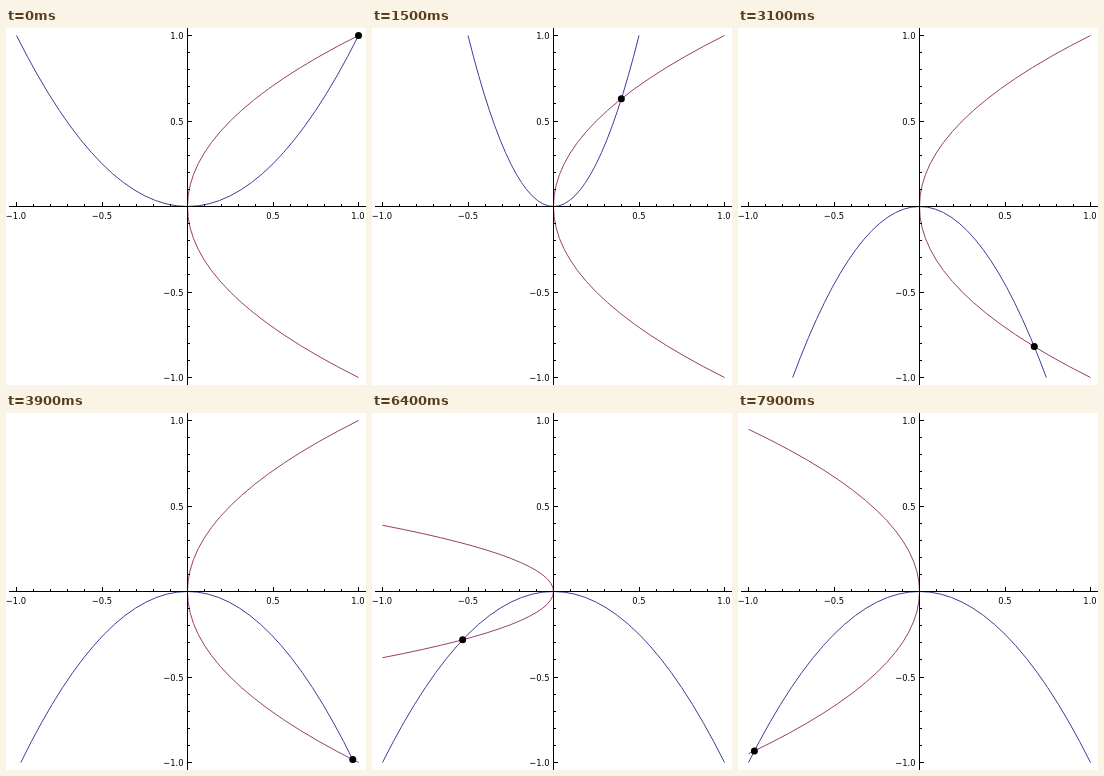
Animation of 360x357 px, one loop 8 s. Source, as an HTML page:

```html
<!DOCTYPE html>
<html lang="en">
<head>
<meta charset="utf-8">
<title>Intersecting parabolas</title>
<style>
  html, body { margin: 0; width: 100%; height: 100%; overflow: hidden; background: #fff; }
  svg { display: block; width: 360px; height: 357px; }
  .curve { fill: none; stroke-width: 1; }
  #axes { fill: none; stroke: #000; stroke-width: 1; shape-rendering: crispEdges; }
  text { font: 9.3px "DejaVu Sans Condensed", "DejaVu Sans", sans-serif; font-stretch: condensed; }
</style>
</head>
<body>
<svg viewBox="0 0 360 357">
  <path id="blue" class="curve" stroke="#3d3d99"/>
  <path id="red" class="curve" stroke="#993d71"/>
  <path id="axes"/>
  <g id="labels"></g>
  <circle id="dot" r="3.5"/>
</svg>
<script>
const CX = 181.5, CY = 178.5, UNIT = 171;
const STEP = 100, STEPS = 80;
const $ = id => document.getElementById(id);
const px = x => CX + UNIT * x;
const py = y => CY - UNIT * y;
const pt = (x, y) => `${px(x).toFixed(2)} ${py(y).toFixed(2)}`;
const quad = (p, c, q) => `M${pt(...p)}Q${pt(...c)} ${pt(...q)}`;

function label(text, x, y, anchor) {
  const el = document.createElementNS("http://www.w3.org/2000/svg", "text");
  el.setAttribute("x", x);
  el.setAttribute("y", y);
  el.setAttribute("text-anchor", anchor);
  el.textContent = text;
  $("labels").append(el);
}

function drawAxes() {
  let d = `M3 ${CY}H360M${CX} 0V357`;
  for (let i = -10; i <= 10; i++) {
    if (!i) continue;
    const major = i % 5 === 0, len = major ? 4.5 : 2.5;
    const x = Math.floor(px(i / 10)) + 0.5, y = Math.floor(py(i / 10)) + 0.5;
    d += `M${x} ${CY}v${-len}M${CX} ${y}h${len}`;
    if (major) {
      const text = (i < 0 ? "\u2212" : "") + Math.abs(i / 10).toFixed(1);
      label(text, x - 0.5, 191, "middle");
      label(text, 177.5, y + 3.5, "end");
    }
  }
  $("axes").setAttribute("d", d);
}

// Curves x² = a·y and y² = b·x, clipped to the unit square
function draw(n) {
  const a = (20 - Math.min(n, 40)) / 20;
  const b = (20 - Math.max(n - 41, 0)) / 20;
  const sa = Math.sign(a), sb = Math.sign(b);
  const ra = Math.sqrt(Math.abs(a)), rb = Math.sqrt(Math.abs(b));
  $("blue").setAttribute("d", quad([-ra, sa], [0, -sa], [ra, sa]));
  $("red").setAttribute("d", quad([sb, rb], [-sb, 0], [sb, -rb]));
  $("dot").setAttribute("cx", px(Math.cbrt(a * a * b)));
  $("dot").setAttribute("cy", py(Math.cbrt(a * b * b)));
}

const start = performance.now();
function tick() {
  const t = Math.max(0, performance.now() - start);
  draw(Math.floor(t / STEP) % STEPS);
  requestAnimationFrame(tick);
}

drawAxes();
draw(0);
requestAnimationFrame(tick);
</script>
</body>
</html>
```
